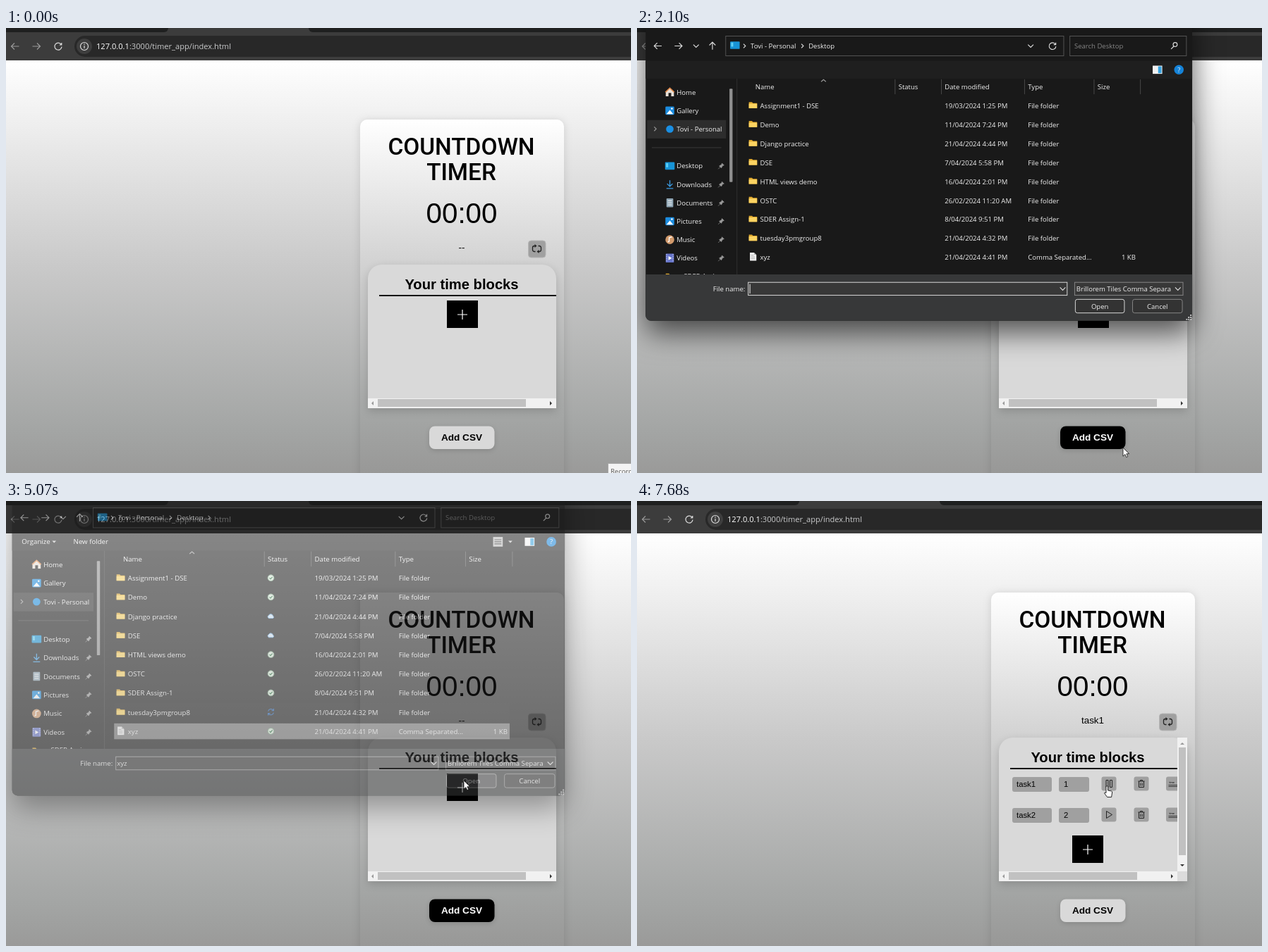
Write an HTML page that moves like this. It is 886 px wide and 632 px high and loops after 8000 ms.

```html
<!DOCTYPE html>
<html lang="en">
<head>
<meta charset="utf-8">
<title>Countdown timer</title>
<style>
html, body { margin: 0; width: 100%; height: 100%; overflow: hidden; background: #9a9a99; }
svg { display: block; width: 886px; height: 632px; }
text { font-family: "Liberation Sans", Arial, sans-serif; white-space: pre; }
.ui text { font: 9.9px "Open Sans", "Noto Sans", sans-serif; fill: #f0f0f0; }
.url { font: 11.1px "Open Sans", "Noto Sans", sans-serif; fill: #c9cacb; }
.title { font: 500 33.4px Roboto, sans-serif; }
.mid { text-anchor: middle; }
.line { fill: none; stroke: #ddd; stroke-width: 1.2; }
#card { filter: drop-shadow(0 1px 6px rgba(0,0,0,.13)); }
#panel { filter: drop-shadow(0 4px 6px rgba(0,0,0,.16)); }
#csvBox { filter: drop-shadow(0 2px 3px rgba(0,0,0,.14)); }
#frame { filter: drop-shadow(0 17px 21px rgba(0,0,0,.64)); }
</style>
</head>
<body>
<svg id="stage" viewBox="0 0 886 632"></svg>
<script>
const LOOP = 8000;
const rect = (x, y, w, h, fill, more = '') =>
  `<rect x="${x}" y="${y}" width="${w}" height="${h}" fill="${fill}" ${more}/>`;
const text = (x, y, s, more = '') => `<text x="${x}" y="${y}" ${more}>${s}</text>`;
const line = (d, more = '') => `<path class="line" d="${d}" ${more}/>`;
const group = (id, body, more = '') => `<g id="${id}" ${more}>${body}</g>`;
const at = (x, y, body) => `<g transform="translate(${x} ${y})">${body}</g>`;
const label = (x, y, s, more) => text(x, y + 3.6, s, more);   // y is the middle of the line
const chevron = (x, y, dir, more) => line(
  dir === 'down' ? `M${x - 4} ${y - 2}l4 4 4-4` : `M${x - 1.5} ${y - 3}l3 3-3 3`, more);
const arrow = (x, y, turn, more = '') =>
  `<g transform="translate(${x} ${y}) rotate(${turn})">${line('M5.5 0H-5.5M-1-4.5L-5.5 0-1 4.5', more)}</g>`;
const reload = (x, y) => at(x, y, line('M4.2-2.6A5 5 0 1 0 5 .6M4.8-5v3H1.8', 'stroke-width="1.5"'));

const defs = `<defs>
  <linearGradient id="pageFill" x2="0" y2="1"><stop stop-color="#fff"/><stop offset=".5" stop-color="#c9c9c9"/>
    <stop offset=".9" stop-color="#a3a5a4"/><stop offset="1" stop-color="#9a9a99"/></linearGradient>
  <linearGradient id="cardFill" gradientUnits="userSpaceOnUse" x1="0" y1="130" x2="0" y2="632">
    <stop stop-color="#fff"/><stop offset=".4" stop-color="#d3d3d3"/>
    <stop offset=".84" stop-color="#a4a6a5"/><stop offset="1" stop-color="#989897"/></linearGradient>
  <clipPath id="sideClip"><rect y="68" width="122" height="288"/></clipPath>
</defs>`;

function browser() {
  return rect(0, 0, 886, 46, '#3c3c3c') + rect(-10, -10, 240, 16, '#1f2020', 'rx="6"') +
    rect(429, -10, 470, 16, '#1f2020', 'rx="6"') + rect(97, 11, 820, 30, '#282828', 'rx="15"') +
    arrow(13, 26, 0, 'style="stroke:#999"') + arrow(43, 26, 180, 'style="stroke:#999"') + reload(74, 26) +
    '<circle cx="111" cy="26" r="11" fill="#3e3e3e"/>' +
    line('M111 25v4M111 22.3v1.4M116.5 26a5.5 5.5 0 1 1-11 0 5.5 5.5 0 0 1 11 0') +
    text(128, 30, '<tspan fill="#fff">127.0.0.1</tspan>:3000/timer_app/index.html', 'class="url"');
}

function plusButton(x, y) {
  return rect(x - 22, y - 20, 44, 39, '#000') + line(`M${x - 7} ${y}h14M${x} ${y - 7}v14`, 'style="stroke:#fff"');
}

function heading(x) {
  return text(x, 371, 'Your time blocks', 'class="mid" font-size="20.2" font-weight="700"') +
    rect(529, 379, 251, 2, '#111');
}

function scrollX(thumb, end) {
  return rect(513, 526, 267, 14, '#f1f1f1') + rect(527, 527, thumb, 11, '#c1c1c1') +
    '<path d="M521 530v6l-3-3z" fill="#999"/>' + `<path d="M${end - 1} 530v6l3-3z" fill="#333"/>`;
}

const play = '<path d="M-3.5-5l8 5-8 5z" fill="none" stroke="#222"/>';
const pause = '<path d="M-4-5h3V5h-3zM1.5-5h3V5h-3z" fill="none" stroke="#222"/>';
const trash = '<path d="M-4.5-3.5h9M-1.5-3.5v-1.5h3v1.5M-3.5-3.5V5h7v-8.5M-1.2-1v4M1.2-1v4" fill="none" stroke="#222"/>';

function task(name, minutes, y, icon) {
  const box = (x, w) => rect(x, y - 10, w, 21, '#a0a0a0', 'rx="3"');
  const key = (x, body) => rect(x - 10.5, y - 10.5, 21, 20, '#a0a0a0', 'rx="3"') + at(x, y - .5, body);
  return box(532, 56) + text(538, y + 4, name, 'font-size="11.3"') +
    box(598, 43) + text(605, y + 4, minutes, 'font-size="11.3"') +
    key(669, icon) + key(715, trash) +
    key(760.5, '<text x="-6" y="-1" font-size="4">time</text><path d="M-7 2H7M-7 4H7" stroke="#222" stroke-width=".8"/>');
}

function page() {
  const refresh = at(752.5, 313.5, '<path d="M-2 4h-1.5a2.5 2.5 0 0 1-2.5-2.5v-3a2.5 2.5 0 0 1 2.5-2.5h1M2-4h1.5a2.5 2.5 0 0 1 2.5 2.5v3a2.5 2.5 0 0 1-2.5 2.5h-1" fill="none" stroke="#222" stroke-width="1.3"/><path d="M-3-6.5l3 2.5-3 2.5zM3 1.5v5l-3-2.5z" fill="#222"/>');
  const empty = heading(646) + plusButton(647, 407) + scrollX(210, 772);
  const filled = heading(639) +
    task('task1', 1, 402, group('play', play) + group('pause', pause)) +
    task('task2', 2, 446, play) + plusButton(639, 495) + scrollX(182, 758) +
    rect(766, 336, 14, 190, '#f1f1f1') + rect(766, 526, 14, 14, '#dcdcdc') + rect(768, 350, 10, 153, '#c1c1c1') +
    '<path d="M770 346h6l-3-3z" fill="#999"/><path d="M770 516h6l-3 3z" fill="#333"/>';
  return rect(0, 46, 886, 586, 'url(#pageFill)') +
    rect(502, 130, 289, 520, 'url(#cardFill)', 'id="card" rx="10"') +
    text(645.5, 179.5, 'COUNTDOWN', 'class="title mid"') + text(645.5, 215.5, 'TIMER', 'class="title mid"') +
    text(646, 277, '00:00', 'class="mid" font-size="40.3"') +
    text(646, 316, '--', 'class="mid" font-size="13.4" id="current"') +
    rect(740.5, 302, 24.5, 24, '#a0a0a0', 'rx="4" stroke="#b5b5b5"') + refresh +
    '<path id="panel" d="M513 540V356a20 20 0 0 1 20-20h227a20 20 0 0 1 20 20v184z" fill="#d9d9d9"/>' +
    group('empty', empty) + group('filled', filled) +
    rect(600, 565.5, 92.5, 32.5, '#d9d9d9', 'id="csvBox" rx="8"') +
    text(646, 586, 'Add CSV', 'id="csvText" class="mid" font-size="13.6" font-weight="700"') +
    group('tip', rect(853.5, 618.5, 60, 30, '#f4f4f4', 'stroke="#aaa"') +
      text(857, 633, 'Record', 'style="font-size:9.5px;fill:#555" class="url"'));
}

// Icons are drawn around their own middle.
const folder = '<path d="M-6-4.5h4.5l1.5 1.5h6v7.5h-12z" fill="#e0a92e"/><path d="M-6-2h12v6.5h-12z" fill="#fcd462"/>';
const screen = rect(-7, -5.5, 14, 11, '#1793d6', 'rx="1"') + rect(-5.5, -4, 3, 6, '#5fd0f5');
const sheet = '<path d="M-4.5-6h6l3.5 3.5v8.5h-9.5z" fill="#f2f2f2"/><path d="M1.5-6v3.5h3.5" fill="#bbb"/>';
const sheetLines = '<path d="M-3-2h4M-3 .5h6M-3 3h6" stroke="#999" stroke-width=".8"/>';
const sideIcons = {
  Home: '<path d="M-6 0L0-6 6 0v6H2V1h-4v5h-4z" fill="#e9e1d8"/><path d="M-6.5 0L0-6 6.5 0" fill="none" stroke="#e28a4a" stroke-width="1.6"/>',
  Gallery: rect(-6.5, -6, 13, 12, '#1c8de0', 'rx="1.5"') + '<path d="M-5 5L0-1 5 5z" fill="#fff"/><circle cx="3" cy="-3" r="1.3" fill="#fff"/>',
  'Tovi - Personal': '<circle r="5.5" fill="#1a8fe3"/>',
  Desktop: screen,
  Downloads: '<path d="M0-6V3M-4-1l4 4 4-4M-5 6H5" fill="none" stroke="#3b9ae0" stroke-width="1.4"/>',
  Documents: rect(-5, -6.5, 10, 13, '#8fa6b5', 'rx="1"') + '<path d="M-3-3h6M-3 0h6M-3 3h6" stroke="#fff"/>',
  Music: '<circle r="6.5" fill="#d29a6c"/><path d="M-1 3V-3L3-4M-1 3h-2" stroke="#fff" stroke-width="1.4" fill="none"/>',
  Videos: rect(-6, -6.5, 12, 13, '#6775c9', 'rx="1"') + '<path d="M-2-3l5 3-5 3z" fill="#fff"/><path d="M-4.7-6V6M4.7-6V6" stroke="#cdd3ff" stroke-dasharray="1.5"/>',
};
sideIcons.Pictures = sideIcons.Gallery;
const pin = '<path d="M1-4l3 3-2 .5-2 3.5-3-3 3.5-2zM-1 1l-3.5 3.5" fill="#9a9a9a" stroke="#9a9a9a" stroke-width=".7"/>';
const status = {
  ok: '<circle r="4.5" fill="#dcebdc" stroke="#6f9a78"/><path d="M-2 0l1.5 1.7 2.7-3.2" fill="none" stroke="#1d6b35" stroke-width="1.2"/>',
  cloud: '<path d="M-3 3a2.5 2.5 0 0 1 0-4.5 3.3 3.3 0 0 1 6 1 2 2 0 0 1 0 3.5z" fill="#d5e9fb" stroke="#6aa7de"/>',
  sync: '<path d="M-4-1a4.2 4.2 0 0 1 7.5-1.5M4 1a4.2 4.2 0 0 1-7.5 1.5M4-5v3h-3M-4 5V2h3" fill="none" stroke="#1f62b8" stroke-width="1.1"/>',
};

const files = [
  ['Assignment1 - DSE', 'ok', '19/03/2024 1:25 PM'], ['Demo', 'ok', '11/04/2024 7:24 PM'],
  ['Django practice', 'cloud', '21/04/2024 4:44 PM'], ['DSE', 'cloud', '7/04/2024 5:58 PM'],
  ['HTML views demo', 'ok', '16/04/2024 2:01 PM'], ['OSTC', 'ok', '26/02/2024 11:20 AM'],
  ['SDER Assign-1', 'ok', '8/04/2024 9:51 PM'], ['tuesday3pmgroup8', 'sync', '21/04/2024 4:32 PM'],
  ['xyz', 'ok', '21/04/2024 4:41 PM'],
];

function sidebar() {
  const names = ['Home', 'Gallery', 'Tovi - Personal', '', 'Desktop', 'Downloads', 'Documents', 'Pictures', 'Music', 'Videos'];
  const items = names.map((name, i) => {
    const y = 88 + 27.1 * i;
    return name && at(36.5, y, sideIcons[name]) + label(46.5, y, name) + (i > 3 ? at(112, y, pin) : '');
  }).join('');
  return rect(3, 129, 116, 27, '#2d2d2d') + chevron(15, 142, 'right', 'style="stroke:#999"') + items +
    rect(10, 169, 102, 1, '#3a3a3a') +
    `<g clip-path="url(#sideClip)">${at(36.5, 359, folder)}${label(57, 358, 'SDER Assign')}</g>` +
    rect(124, 83, 4.5, 137, '#8f8f8f', 'rx="1"') + rect(134.5, 68, 1, 288, '#303030');
}

function fileList() {
  const heads = [[162, 'Name'], [372, 'Status'], [440, 'Date modified'], [562, 'Type'], [664, 'Size']];
  const rows = files.map(([name, state, date], i) => {
    const y = 108 + 27.85 * i, last = i === files.length - 1;
    return at(158.5, y - 1, last ? sheet + sheetLines : folder) + label(169, y, name) +
      `<g class="late">${at(376.5, y - .5, status[state])}</g>` + label(440, y, date) +
      label(562, y, last ? 'Comma Separated...' : 'File folder') +
      (last ? label(720, y, '1 KB', 'text-anchor="end"') : '');
  }).join('');
  return heads.map(([x, s]) => label(x, 80, s)).join('') +
    [367, 435, 557, 659, 727].map(x => rect(x - .5, 69, 1, 22, '#4a4a4a')).join('') +
    line('M258.5 72.5l3.5-3 3.5 3', 'style="stroke:#999"') +
    group('near', rect(149, 289, 574, 28, '#1b1b1b')) + group('row', rect(149, 319, 574, 23, '#777')) + rows;
}

function dialog() {
  const box = (x, y, w, h, fill, edge, more = '') => rect(x + .5, y + .5, w - 1, h - 1, fill, `stroke="${edge}" ${more}`);
  const late = body => `<g class="late">${body}</g>`;
  const drop = (x, y) => `<path d="M${x - 3} ${y - 1.5}h6l-3 3z" fill="#ccc"/>`;
  const top = rect(1, 42, 802, 26, '#1f1f1f') +
    arrow(19, 20, 0) + arrow(49, 20, 180) + chevron(75, 20, 'down') + arrow(99, 20, 90) +
    box(118, 5, 497, 30, '#191919', '#555') + at(132, 19, screen) + chevron(146, 20, 'right') +
    label(155, 20, 'Tovi - Personal') + chevron(231, 20, 'right') + label(240, 20, 'Desktop') +
    late(chevron(287, 20, 'right')) + chevron(566, 20, 'down') + reload(598, 20) +
    box(623, 5, 172, 30, '#191919', '#555') + label(630, 20, 'Search Desktop', 'style="fill:#858585"') +
    line('M781 18a3 3 0 1 1-6 0 3 3 0 0 1 6 0M776 20.5l-4 4') +
    late(label(15, 55, 'Organize') + drop(62, 55) + label(90, 55, 'New folder') +
      rect(699, 48, 14, 14, '#bbb') + line('M701 52h10M701 55h10M701 58h10', 'style="stroke:#333"') + drop(724, 55)) +
    rect(745, 49, 14, 12, '#f2f2f2') + rect(753, 50, 5, 10, '#36a3e0') +
    '<circle cx="783.5" cy="55" r="7" fill="#1583d8"/>' + label(783.5, 55, '?', 'class="mid"');
  const foot = '<path d="M1 356h802v60a8 8 0 0 1-8 8H9a8 8 0 0 1-8-8z" fill="#373839"/>' +
    label(147, 377, 'File name:', 'text-anchor="end"') +
    box(151, 367, 469, 20, '#383838', '#ddd', 'id="nameBox"') + label(153, 377, 'xyz', 'id="fileName"') +
    group('caret', rect(153.5, 370, 1, 14, '#fff')) + chevron(613, 377, 'down', 'stroke-width="1"') +
    box(630, 367, 160, 20, '#383838', '#888') + label(633, 377, 'Brillorem Tiles Comma Separa') +
    chevron(782, 377, 'down') +
    box(631, 392, 73, 21, '#333', '#ddd', 'id="open" rx="3"') + label(667.5, 403, 'Open', 'class="mid"') +
    box(715, 392, 74, 21, '#333', '#888', 'rx="3"') + label(752, 403, 'Cancel', 'class="mid"') +
    '<path d="M794 422h8M797 419h5M800 416h2" stroke="#ccc" stroke-width="2" stroke-dasharray="2 1"/>';
  return rect(1, -40, 802, 464, '#191919', 'id="frame" rx="8"') + top + sidebar() + fileList() + foot;
}

const arrowShape = '<path d="M0 0V12.2L2.9 9.5 4.7 13.6 6.7 12.7 4.9 8.7H8.7Z" fill="#fff" stroke="#111" stroke-width=".8"/>';
const handShape = '<path d="M-1 1a1.3 1.3 0 0 1 2.6 0v5l5 1q1.2.4 1 2l-1 6.5h-6l-4-5.5q0-2 2.4-.5z" fill="#fff" stroke="#111" stroke-width=".9"/>';

document.getElementById('stage').innerHTML = defs + browser() + page() + group('dialog', dialog(), 'class="ui"') +
  group('cursor', group('pointer', arrowShape) + group('hand', handShape));

const $ = id => document.getElementById(id);
const show = (el, on) => { el.style.display = on ? '' : 'none'; };
const ramp = (t, a, b) => Math.min(1, Math.max(0, (t - a) / (b - a)));
const late = [...document.querySelectorAll('.late')];

// Cursor stops: time, x, y
const stops = [
  [0, 860, 655], [30, 800, 634], [420, 694, 592], [740, 666, 588], [930, 666, 588], [950, 668, 588],
  [1480, 668, 588], [1600, 661, 578], [1730, 668, 587], [1990, 668, 587], [2100, 689, 596], [2250, 680, 590],
  [2790, 236, 312], [2890, 228, 319], [3050, 215, 328], [3250, 215, 328], [3620, 541, 375],
  [4220, 649, 397], [5650, 649, 397], [6380, 666, 405], [LOOP, 666, 405],
];

function cursorAt(t) {
  const i = stops.findIndex(s => s[0] > t);
  const [a, x, y] = stops[i - 1], [b, u, v] = stops[i];
  let p = ramp(t, a, b);
  p = p * p * (3 - 2 * p);
  return [x + (u - x) * p, y + (v - y) * p];
}

function draw(t) {
  const opening = ramp(t, 2030, 2200), closing = ramp(t, 4990, 5165);
  const scale = 1 - .1 * (1 - opening) ** 2 - .05 * closing;
  $('dialog').setAttribute('transform', `translate(${(1 - scale) * 333} ${(1 - scale) * 182}) scale(${scale})`);
  $('dialog').style.opacity = Math.min(1, opening * 2.6) * (1 - closing);
  show($('dialog'), t > 2030 && t < 5165);
  late.forEach(el => show(el, t > 2300));

  const picked = t >= 3150, hoverOpen = t >= 4080;
  show($('near'), t > 2850);
  show($('row'), t >= 2960);
  $('row').style.opacity = picked ? 1 : .45;
  show($('fileName'), picked);
  show($('caret'), !picked);
  $('nameBox').setAttribute('stroke', picked ? '#999' : '#ddd');
  $('open').setAttribute('fill', hoverOpen ? '#494a4b' : '#333');
  $('open').setAttribute('stroke', hoverOpen ? '#999' : '#ddd');

  const dark = ramp(t, 420, 700) - ramp(t, 5650, 5930);
  const grey = v => `rgb(${v},${v},${v})`;
  $('csvBox').setAttribute('fill', grey(217 * (1 - dark)));
  $('csvText').setAttribute('fill', grey(255 * dark));
  show($('tip'), t < 200);

  const loaded = t >= 5200, running = t >= 7550;
  show($('empty'), !loaded);
  show($('filled'), loaded);
  show($('play'), !running);
  show($('pause'), running);
  $('current').textContent = running ? 'task1' : '--';

  const onButton = t >= 6020;
  show($('pointer'), !onButton);
  show($('hand'), onButton);
  $('cursor').setAttribute('transform', `translate(${cursorAt(t)})`);
}

function tick() {
  draw(performance.now() % LOOP);
  requestAnimationFrame(tick);
}
tick();
</script>
</body>
</html>
```
